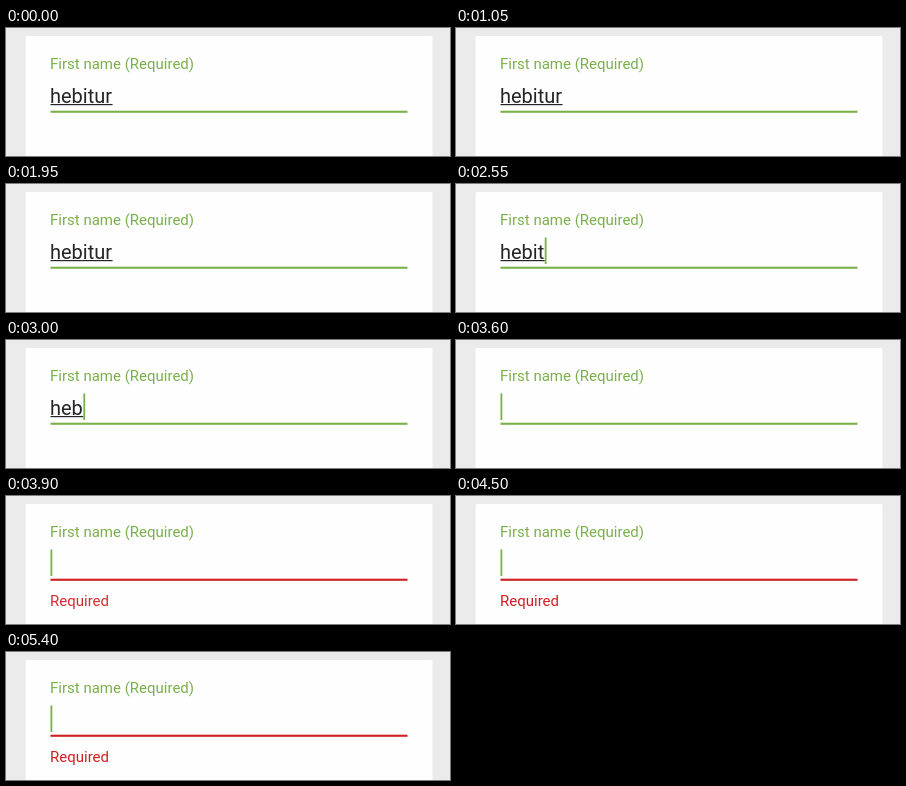
An HTML page with a canvas for the animation above (5.58 s loop, 444 px wide and 128 px high).

```html
<!DOCTYPE html>
<html lang="en">
<head>
<meta charset="utf-8">
<title>Required field</title>
<style>
  html, body { margin: 0; width: 100%; height: 100%; overflow: hidden; background: #ebebeb; }
  canvas { display: block; width: 444px; height: 128px; }
</style>
</head>
<body>
<canvas id="stage" width="444" height="128"></canvas>
<script>
const ctx = document.getElementById('stage').getContext('2d', { alpha: false });

const LOOP = 5580;
const LEFT = 44;
const NAME = 'hebitur';
const GREEN = '#7ab04a', RED = '#d01f22', INK = '#252525';

const deleteTimes = [2250, 2550, 2850, 3000, 3300, 3450, 3600];
const caretToggles = [450, 1050, 1500, 1950, 2250, 4200, 4500, 4950, 5400];
const ERROR_TIME = 3750, ERROR_STEP = 150;
const errorFade = [0.5, 0.94, 1];

const passed = (times, t) => times.filter(time => time <= t).length;

function rect(x, y, w, h, color) {
  ctx.fillStyle = color;
  ctx.fillRect(x, y, w, h);
}

function text(string, baseline, size, color) {
  ctx.font = `${size}px Roboto, sans-serif`;
  ctx.fillStyle = color;
  ctx.fillText(string, LEFT, baseline);
  return ctx.measureText(string).width;
}

function drawCard() {
  rect(0, 0, 444, 128, '#ebebeb');
  ctx.fillStyle = '#fefefe';
  ctx.beginPath();
  ctx.roundRect(19.5, 8, 407, 130, 1.5);
  ctx.fill();
}

function drawError(t) {
  const step = Math.floor((t - ERROR_TIME) / ERROR_STEP);
  ctx.globalAlpha = errorFade[Math.min(step, errorFade.length - 1)];
  text('Required', 110, 15, RED);
  ctx.globalAlpha = 1;
}

function draw(t) {
  const invalid = t >= ERROR_TIME;
  drawCard();
  text('First name (Required)', 41, 15, GREEN);

  const typed = NAME.slice(0, NAME.length - passed(deleteTimes, t));
  const width = text(typed, 74.5, 20, INK);
  rect(LEFT + 0.5, 76, width, 1.2, INK);
  if (passed(caretToggles, t) % 2) rect(LEFT + 0.5 + width, 53.5, 1.8, 26.5, GREEN);

  rect(LEFT + 0.5, 82.7, 357, 2.1, invalid ? RED : GREEN);
  if (invalid) drawError(t);
}

const start = performance.now();
function tick() {
  draw((performance.now() - start) % LOOP);
  requestAnimationFrame(tick);
}
tick();
</script>
</body>
</html>
```
